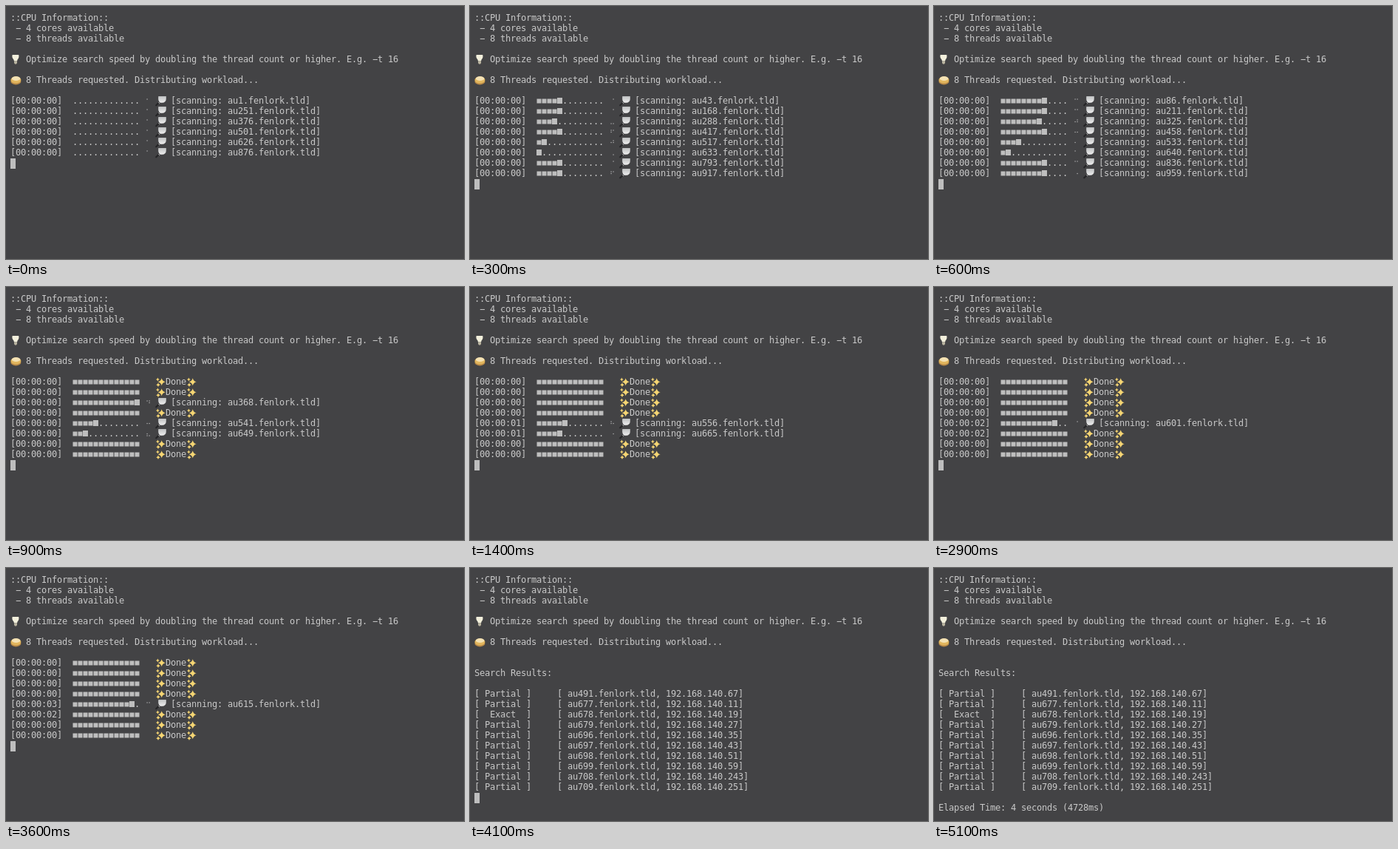
An HTML page that plays this animation: 620 by 342 pixels, repeating every 5.5 s.

```html
<!DOCTYPE html>
<html lang="en">
<head>
<meta charset="utf-8">
<title>Terminal scan</title>
<style>
  html, body { margin: 0; width: 100%; height: 100%; overflow: hidden; background: #434345; }
  svg { display: block; width: 100%; height: 100%; }
  text { font: 12px "DejaVu Sans Mono", monospace; fill: #c9c9c9; white-space: pre; }
  .block { fill: #bebebe; }
</style>
</head>
<body>
<svg viewBox="0 0 620 342">
  <defs>
    <linearGradient id="lens" x2="0" y2="1">
      <stop offset="0" stop-color="#bfc1c2"/><stop offset="1" stop-color="#eeeeee"/>
    </linearGradient>
    <g id="magnifier">
      <path d="M5 8.5L1.3 12.2" stroke="#242426" stroke-width="2.2" stroke-linecap="round"/>
      <path d="M4.3 0H14.8V3.5A5.2 5.2 0 0 1 9.6 8.8Q7.5 9 6 8.2Q3.6 6 4.3 0Z" fill="url(#lens)"/>
      <path d="M4.4 8.4L6 9.6" stroke="#dcdcdc" stroke-width="1"/>
    </g>
    <g id="bulb">
      <path d="M2.6 0H11.2Q12.2 4 9.6 6.4L9 8.6H5L4.4 6.4Q1.6 4 2.6 0Z" fill="#f3f0dc"/>
      <path d="M5 8.4H9V11L8 12.4H6L5 11Z" fill="#b9b4a0"/>
    </g>
    <g id="cake">
      <ellipse cx="7.4" cy="8" rx="7" ry="4.4" fill="#b98a48"/>
      <ellipse cx="7.4" cy="6" rx="7" ry="4.6" fill="#e2b65e"/>
      <ellipse cx="7.6" cy="4" rx="5.8" ry="3" fill="#f4e2b4"/>
    </g>
    <path id="star" d="M0-5Q.9-.9 5 0Q.9.9 0 5Q-.9.9-5 0Q-.9-.9 0-5Z" fill="#f5d573"/>
    <g id="sparkles">
      <use href="#star" x="8.7" y="6.3"/>
      <use href="#star" transform="translate(3.4 3) scale(.5)"/>
      <use href="#star" transform="translate(4 10.3) scale(.55)"/>
    </g>
  </defs>
  <g id="screen"></g>
</svg>
<script>
const LOOP = 5500, STEP = 100, RESULTS_AT = 4100, ELAPSED_AT = 4700;
const CELL = 7, LINE = 14, LEFT = 6, TOP = 10;
const SHARE = 125, BAR = 13, FIRST_ROW = 8;
const TICKS = [..."⠁⠁⠉⠙⠚⠒⠂⠂⠒⠲⠴⠤⠄⠄⠤⠠⠠⠤⠦⠖⠒⠐⠐⠒⠓⠋⠉⠈⠈"];

// Per thread: [time, hosts checked] points, joined linearly; the last one is the finish.
const threads = [
  [[0, 0], [600, 85], [900, SHARE]],
  [[0, 0], [600, 85], [900, SHARE]],
  [[0, 0], [600, 74], [950, SHARE]],
  [[0, 0], [600, 82], [900, SHARE]],
  [[0, 0], [600, 32], [1400, 55], [2100, 74], [2900, 100], [4080, SHARE]],
  [[0, 0], [600, 14], [1400, 39], [2100, 59], [2500, 73], [2800, SHARE]],
  [[0, 0], [600, 85], [900, SHARE]],
  [[0, 0], [600, 83], [900, SHARE]]
];
const lateThreads = [1, 6];

const matches = [[491, 67], [677, 11], [678, 19], [679, 27], [696, 35],
  [697, 43], [698, 51], [699, 59], [708, 243], [709, 251]];

const colX = col => LEFT + col * CELL;
const rowY = row => TOP + row * LINE - 14 + 10;
const host = n => `au${n}.fenlork.tld`;

// Every character sits on the terminal grid.
function put(row, col, string) {
  const xs = [...string].map((_, i) => colX(col + i)).join(" ");
  return `<text x="${xs}" y="${rowY(row) + 14}">${string}</text>`;
}

const cellTop = row => TOP + row * LINE;
const icon = (name, row, col) => `<use href="#${name}" x="${colX(col)}" y="${cellTop(row)}"/>`;
const block = (x, y, w, h) => `<rect class="block" x="${x}" y="${y}" width="${w}" height="${h}"/>`;
const cursor = row => block(LEFT, cellTop(row), 7, 14);

function progress(points, t) {
  const end = points.findIndex(p => p[0] > t);
  if (end < 0) return SHARE;
  const [t0, a] = points[end - 1], [t1, b] = points[end];
  return Math.floor(a + (b - a) * (t - t0) / (t1 - t0));
}

function bar(row, done) {
  const filled = Math.floor(done / SHARE * BAR);
  const y = cellTop(row);
  let out = "";
  for (let i = 0; i < filled; i++) out += block(colX(12 + i) + .5, y + 3.5, 6, 6);
  if (done > 0 && done < SHARE) out += block(colX(12 + filled), y + 2, 7, 8);
  const dotsFrom = done > 0 ? filled + 1 : 0;
  if (dotsFrom < BAR) out += put(row, 12 + dotsFrom, ".".repeat(BAR - dotsFrom));
  return out;
}

function spinner(row, done) {
  const bits = TICKS[(2 * done + 1) % TICKS.length].codePointAt(0) - 0x2800;
  let out = "";
  for (let i = 0; i < 6; i++) {
    if (bits >> i & 1) {
      out += block(colX(26) + 2.5 + 3 * Math.floor(i / 3), cellTop(row) + 3.4 + 2.5 * (i % 3), 1.2, 1.2);
    }
  }
  return out;
}

function threadLine(index, row, t) {
  const points = threads[index];
  const done = progress(points, t);
  const seconds = Math.floor(Math.min(t, points[points.length - 1][0]) / 1000);
  const start = put(row, 0, `[00:00:0${seconds}]`) + bar(row, done);
  if (done >= SHARE) {
    return start + icon("sparkles", row, 28) + put(row, 30, "Done") + icon("sparkles", row, 34);
  }
  return start + spinner(row, done) + icon("magnifier", row, 28) +
    put(row, 31, `[scanning: ${host(1 + SHARE * index + done)}]`);
}

function scanning(t) {
  const shown = threads.map((_, i) => i).filter(i => t >= STEP || !lateThreads.includes(i));
  return shown.map((index, i) => threadLine(index, FIRST_ROW + i, t)).join("") +
    cursor(FIRST_ROW + shown.length);
}

function results(t) {
  const lines = matches.map(([n, octet], i) => {
    const kind = n === 678 ? " Exact " : "Partial";
    return put(11 + i, 0, `[ ${kind} ]     [ ${host(n)}, 192.168.140.${octet}]`);
  });
  return put(9, 0, "Search Results:") + lines.join("") +
    (t < ELAPSED_AT ? cursor(21) : put(22, 0, "Elapsed Time: 4 seconds (4728ms)"));
}

const header = put(0, 0, "::CPU Information::") +
  put(1, 1, "− 4 cores available") +
  put(2, 1, "− 8 threads available") +
  icon("bulb", 4, 0) +
  put(4, 3, "Optimize search speed by doubling the thread count or higher. E.g. −t 16") +
  icon("cake", 6, 0) +
  put(6, 3, "8 Threads requested. Distributing workload...");

const screenGroup = document.getElementById("screen");
let drawn = -1;

function render(time) {
  const t = Math.floor(time % LOOP / STEP) * STEP;
  if (t === drawn) return;
  drawn = t;
  screenGroup.innerHTML = header + (t < RESULTS_AT ? scanning(t) : results(t));
}

const began = performance.now();
function tick() {
  render(performance.now() - began);
  requestAnimationFrame(tick);
}
tick();
</script>
</body>
</html>
```
